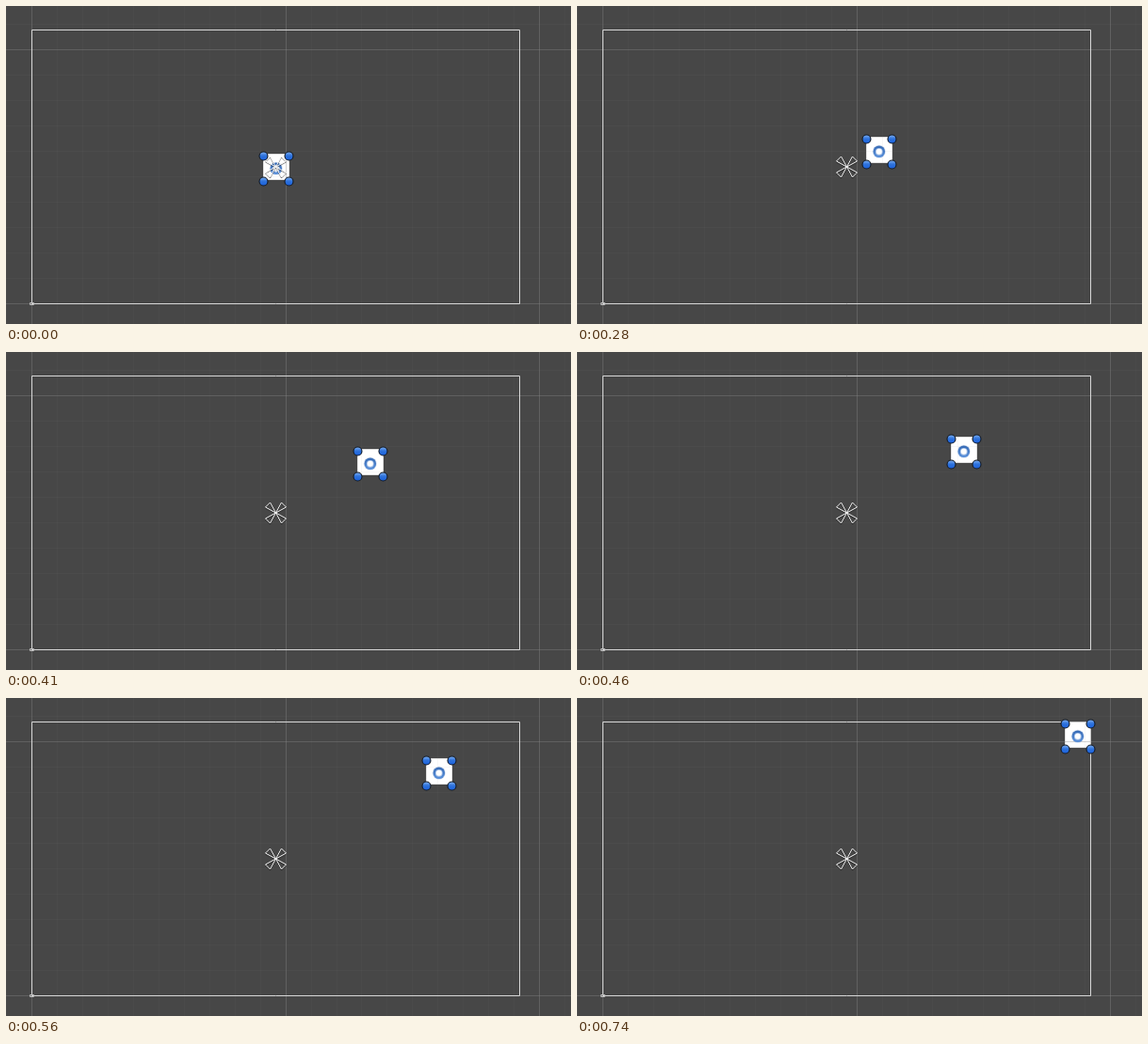
These frames come from a looping animation (600x338 px, 0.88 s). An HTML page with a canvas:

```html
<!DOCTYPE html>
<html lang="en">
<head>
<meta charset="utf-8">
<title>Moving a sprite to the corner</title>
<style>
  html, body { margin: 0; width: 100%; height: 100%; overflow: hidden; background: #474747; }
  canvas { display: block; }
</style>
</head>
<body>
<canvas id="stage" width="600" height="338"></canvas>
<script>
const ctx = document.getElementById('stage').getContext('2d');
const LOOP = 880;
const SIZE = 27;

// [time in ms, left edge of the handles]
const steps = [
  [0, 273], [230, 283], [280, 307], [330, 331], [370, 352], [410, 373], [460, 397],
  [510, 421], [560, 446], [600, 466], [640, 487], [690, 511], [740, 518]
];
const topFor = x => Math.round(159.3 - (x - 273) * 0.5388);

function line(x1, y1, x2, y2) {
  ctx.beginPath();
  ctx.moveTo(x1, y1);
  ctx.lineTo(x2, y2);
  ctx.stroke();
}

function disc(x, y, r, fill) {
  ctx.beginPath();
  ctx.arc(x, y, r, 0, Math.PI * 2);
  ctx.fillStyle = fill;
  ctx.fill();
}

function grid() {
  ctx.lineWidth = 1;
  for (let i = -1; i <= 21; i++) {
    const major = i % 10 === 0;
    ctx.strokeStyle = major ? 'rgba(138,138,138,.38)' : 'rgba(138,138,138,.06)';
    const x = Math.round(27 + i * 26.96);
    const y = 316 - i * 27;
    line(x, -1, x, 339);
    if (y > -1) line(-1, y, 601, y);
  }
}

function frame() {
  ctx.lineWidth = 1;
  ctx.strokeStyle = '#d8d8d8';
  ctx.strokeRect(27, 25, 518, 291);
  ctx.strokeStyle = '#c0c0c0';
  ctx.strokeRect(25, 315, 4, 2);
}

function ring(x, y) {
  disc(x, y, 7, 'rgba(90,130,190,.25)');
  const shade = ctx.createLinearGradient(0, y - 6, 0, y + 6);
  shade.addColorStop(0, '#376bb5');
  shade.addColorStop(1, '#5b91db');
  disc(x, y, 6.3, shade);
  disc(x, y, 3.9, '#a9c3e8');
  disc(x, y, 3, '#fff');
}

function handle(x, y) {
  disc(x, y, 5, '#141c28');
  const shade = ctx.createLinearGradient(0, y - 4, 0, y + 4);
  shade.addColorStop(0, '#76aaf0');
  shade.addColorStop(0.45, '#2f73dc');
  shade.addColorStop(1, '#1c62dc');
  disc(x, y, 3.9, shade);
}

// Four petals that meet in the middle
function anchors(x, y) {
  const petals = new Path2D();
  for (const sx of [-1, 1]) {
    for (const sy of [-1, 1]) {
      petals.moveTo(x, y);
      petals.lineTo(x + sx * 11, y + sy * 6);
      petals.lineTo(x + sx * 6, y + sy * 11);
      petals.closePath();
    }
  }
  ctx.lineJoin = 'round';
  ctx.save();
  ctx.translate(0, 1);
  ctx.strokeStyle = 'rgba(0,0,0,.5)';
  ctx.stroke(petals);
  ctx.restore();
  ctx.strokeStyle = '#f2f2f2';
  ctx.stroke(petals);
}

function draw(t) {
  const x = steps.filter(s => s[0] <= t).pop()[1];
  const y = topFor(x);

  ctx.setTransform(1, 0, 0, 1, 0, 0);
  ctx.fillStyle = '#474747';
  ctx.fillRect(0, 0, 600, 338);
  ctx.fillStyle = '#fff';
  ctx.fillRect(x, y - 2, SIZE + 1, SIZE + 1);

  ctx.translate(0.5, 0.5);
  grid();
  frame();
  ctx.strokeStyle = 'rgba(150,150,150,.3)';
  ctx.strokeRect(x, y - 2, SIZE, SIZE);
  ring(x + 13.3, y + 13.3);
  anchors(286, 170.5);
  for (const dx of [0, SIZE]) {
    for (const dy of [0, SIZE]) handle(x + dx, y + dy);
  }
}

const start = performance.now();
function tick() {
  draw((performance.now() - start) % LOOP);
  requestAnimationFrame(tick);
}
tick();
</script>
</body>
</html>
```
